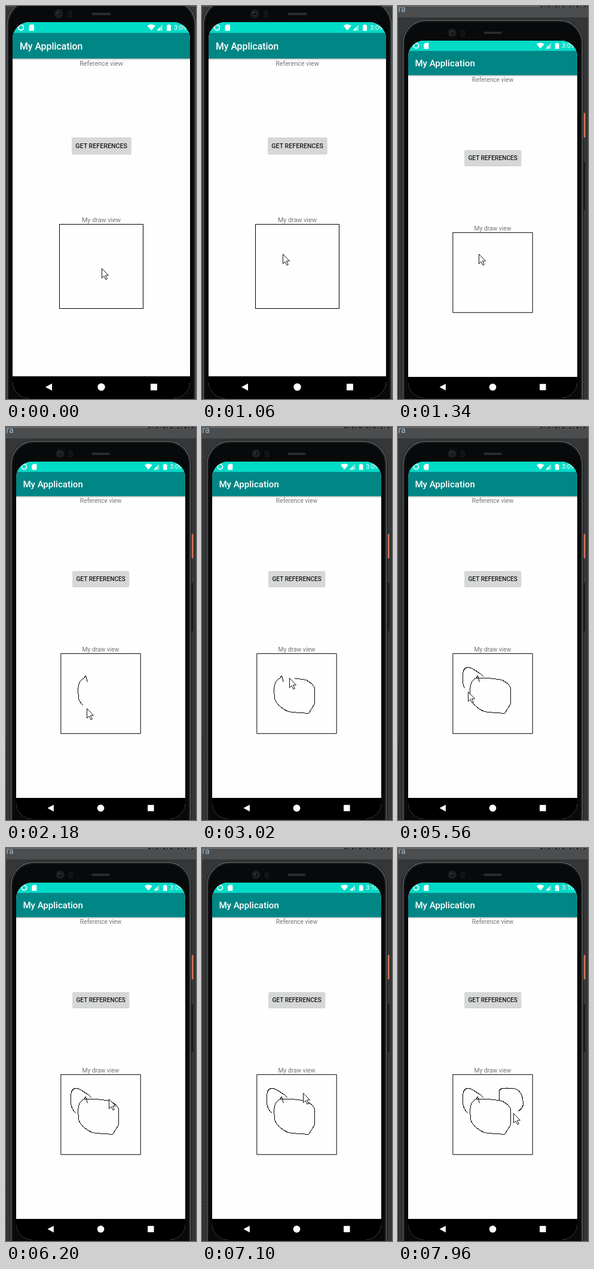
An HTML page that plays this animation: 318 by 658 pixels, repeating every 8000 ms.

```html
<!DOCTYPE html>
<html lang="en">
<head>
<meta charset="utf-8">
<title>Draw view</title>
<style>
  html, body { margin: 0; width: 100%; height: 100%; overflow: hidden; background: #343637; }
  svg { display: block; width: 318px; height: 658px; }
  text { font-family: Roboto, Arial, sans-serif; }
  .mid { text-anchor: middle; }
  .label { font-size: 10.8px; fill: #757575; }
  .ink { fill: none; stroke: #000; shape-rendering: crispEdges; vector-effect: non-scaling-stroke; }
</style>
</head>
<body>
<svg viewBox="0 0 318 658">
  <defs>
    <linearGradient id="shade" x2="0" y2="1">
      <stop offset="0" stop-color="#b4b8b8"/><stop offset="1" stop-color="#fff"/>
    </linearGradient>
    <clipPath id="screen"><rect x="11" y="27" width="297" height="630" rx="28"/></clipPath>
  </defs>

  <rect width="318" height="658" fill="#343637"/>
  <path d="M0 .5H318" stroke="#5b5e60"/>
  <path d="M.5 525V658" stroke="#15181a" stroke-dasharray="4 2"/>

  <g id="desk">
    <rect width="318" height="19" fill="#4b4d4e"/>
    <path d="M0 .5H318" stroke="#77797a"/>
    <path d="M238 1H318" stroke="#2b2d2e" stroke-width="2" stroke-dasharray="5 2 2 3"/>
    <text x=".5" y="9.500" font-size="14" fill="#9fbcd2">ra</text>
    <rect x="310.500" y="179" width="3" height="41" rx="1" fill="#d4735a"/>
    <rect x="310.500" y="261" width="3" height="81" rx="1" fill="#191b1c"/>
  </g>

  <g id="phone">
    <rect x=".5" y="-10.500" width="318" height="720" rx="42" fill="#17191a" stroke="#17191a"/>
    <rect x="2" y="-9" width="315" height="717" rx="40" fill="#1c1e1f" stroke="#606365" stroke-width="1.500"/>
    <rect x="5" y="-6" width="309" height="711" rx="37" fill="#08090a"/>
    <circle cx="88" cy="13" r="7.500" fill="#1b1d1f"/>
    <circle cx="88" cy="13" r="3.200" fill="#050607" stroke="#34383c"/>
    <circle cx="87" cy="12" r="1" fill="#666b70"/>
    <rect x="104" y="8" width="6" height="11" rx="2" fill="#101213" stroke="#1d1f21"/>
    <rect x="143" y="11" width="33" height="4.500" rx="2.200" fill="#202325"/>
    <path d="M145 13.200H174" stroke="#3a3d40" stroke-width="2" stroke-dasharray="2 1.500"/>

    <g clip-path="url(#screen)">
      <rect x="11" y="27" width="297" height="632" fill="#fefefe"/>
      <rect x="11" y="27" width="297" height="18" fill="#00dbc7"/>
      <rect x="11" y="45" width="297" height="43" fill="#008685"/>
      <rect x="11" y="88" width="297" height="3" fill="url(#shade)"/>
      <rect x="11" y="620" width="297" height="38" fill="#000"/>

      <circle cx="25" cy="36" r="4.400" fill="none" stroke="#fff" stroke-width="1.800"/>
      <path d="M41 31H47V41.500H38.500V33.500Z" fill="#fff"/>
      <path d="M236.500 33Q243 28.500 250 33L243.200 41Z" fill="#fff"/>
      <path d="M262 31V41H252.500Z" fill="#7fede3"/>
      <path d="M258 35.200V41H252.500Z" fill="#fff"/>
      <path d="M271 31H274V32H276V41.500H269V32H271Z" fill="#fff"/>
      <text id="clock" x="281" y="40" font-size="11.200" fill="#fff">3:09</text>

      <text x="23" y="72.700" font-size="15.800" font-weight="500" fill="#fff">My Application</text>
      <text class="mid label" x="159.500" y="99.500">Reference view</text>
      <rect x="110" y="220.500" width="99.500" height="28" rx="2" fill="#c4c5c5"/>
      <rect x="110" y="220" width="99.500" height="27.700" rx="2" fill="#d6d7d7"/>
      <text class="mid" x="159.700" y="237.700" font-size="10.700" font-weight="500" fill="#1c1c1c">GET REFERENCES</text>
      <text class="mid label" x="159.500" y="362">My draw view</text>
      <rect class="ink" x="89.500" y="365.500" width="140" height="141"/>

      <path d="M66 638L77 632V644Z" fill="#fff"/>
      <circle cx="159.500" cy="638" r="6.200" fill="#fff"/>
      <rect x="242" y="632.500" width="11" height="11" rx=".6" fill="#fff"/>
    </g>
  </g>

  <g id="strokes" transform="translate(.5 .5)"></g>
  <path id="cursor" d="M.5 .5V16.500L4 13L7 19L9.300 18L6.500 12H11.500Z" fill="#fff" stroke="#111" stroke-linejoin="round"/>
</svg>

<script>
const LOOP = 8000, SHRINK = 1340, TICK = 6730, STEP = 120, LAG = 9;
const $ = id => document.getElementById(id);
const smooth = p => p * p * (3 - 2 * p);
const brake = p => 1 - (1 - p) ** 3;

// The pointer follows each path in turn; with ink it leaves a line behind
const gestures = [
  { start: 0, end: 1060, ease: brake, d: 'M160 439Q134 430 130 415H135' },
  { start: 1460, end: 3320, ease: smooth, ink: true,
    d: 'M136 427L133 416L130 420C118 426 120 440 121 453C122 463 138 476 150 477L178 479L188 463V436L184 430L174 423L152 420H130' },
  { start: 3470, end: 3710, ease: smooth, d: 'M130 420L143 417' },
  { start: 4360, end: 5560, ease: smooth, ink: true,
    d: 'M143 418L138 413C131 409 124 402 117 402S108 408 108 416V428C110 436 112 441 117 443' },
  { start: 5720, end: 6200, ease: smooth, d: 'M117 443C132 428 172 398 172 420' },
  { start: 6850, end: 7960, ease: smooth, ink: true,
    d: 'M169 422V406C170 401 180 401 193 402C204 404 209 415 209 430C206 438 200 441 193 444' }
];

gestures.forEach(g => {
  g.path = document.createElementNS('http://www.w3.org/2000/svg', 'path');
  g.path.setAttribute('d', g.d);
  g.path.setAttribute('class', 'ink');
  g.length = g.path.getTotalLength();
  if (g.ink) $('strokes').append(g.path);
});

function travelled(g, t) {
  if (t >= g.end) return g.length;
  const stepped = Math.floor((t - g.start) / STEP) * STEP;
  return g.length * g.ease(Math.max(0, stepped) / (g.end - g.start));
}

function draw(now) {
  const t = now % LOOP;
  const small = t >= SHRINK;
  $('desk').style.display = small ? '' : 'none';
  $('phone').setAttribute('transform', small ? 'translate(17 58) scale(.953 .9494) translate(-11 -27)' : '');
  $('clock').textContent = t >= TICK ? '3:10' : '3:09';

  const current = gestures.findLast(g => g.start <= t);
  const tip = current.path.getPointAtLength(travelled(current, t));
  $('cursor').setAttribute('transform', `translate(${Math.round(tip.x)} ${Math.round(tip.y)})`);

  gestures.filter(g => g.ink).forEach(g => {
    const lag = t < g.end + STEP ? LAG : 0;
    const shown = Math.max(0, travelled(g, t) - lag);
    g.path.style.display = shown ? '' : 'none';
    g.path.setAttribute('stroke-dasharray', `${shown} 999`);
  });
}

const begin = performance.now();
function loop() {
  draw(performance.now() - begin);
  requestAnimationFrame(loop);
}
loop();
</script>
</body>
</html>
```
